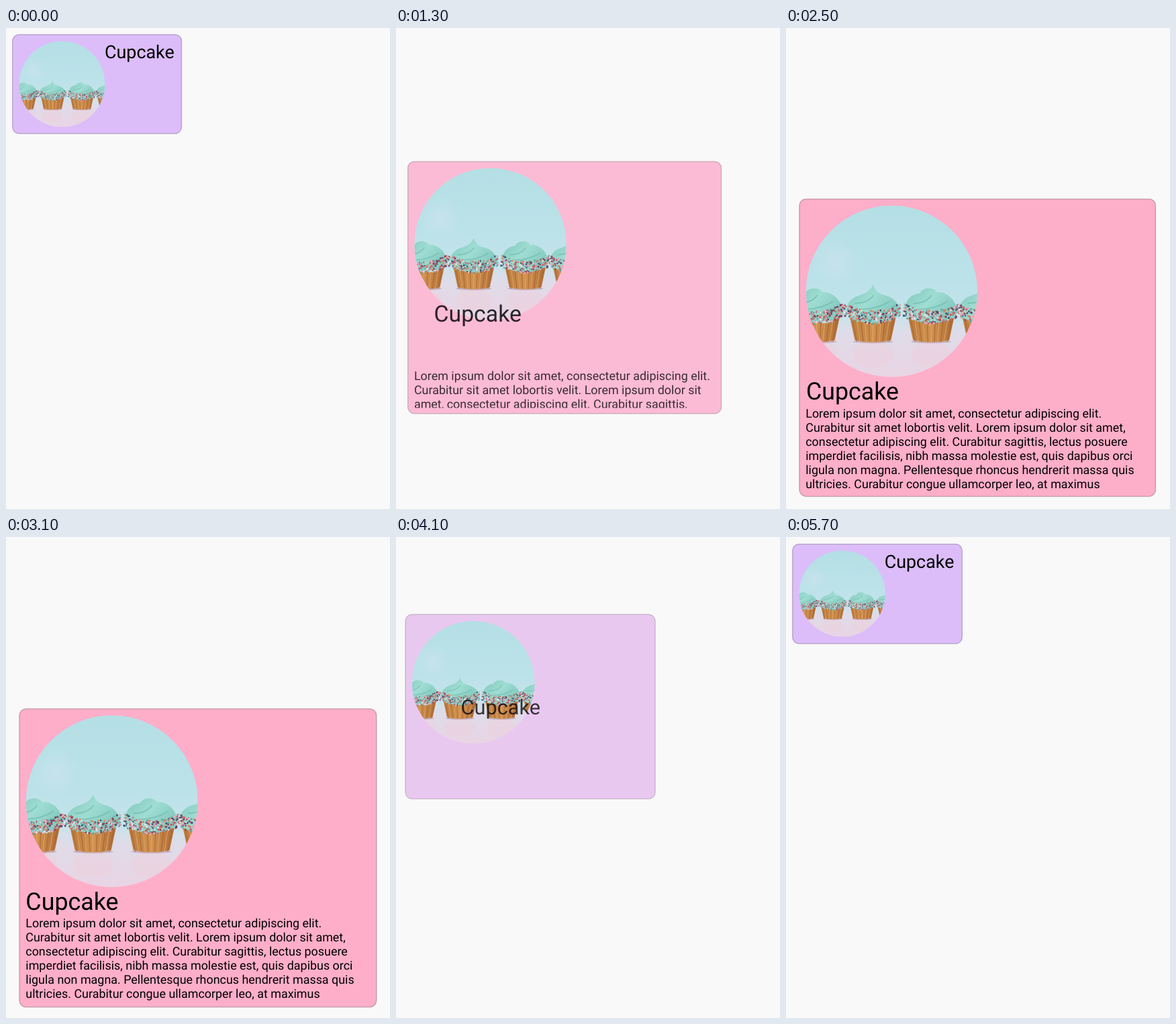
Recreate the animation shown at these times as an HTML page. Size 572 by 716 pixels, loop 5800 ms.

```html
<!DOCTYPE html>
<html lang="en">
<head>
<meta charset="utf-8">
<title>Cupcake card</title>
<style>
  html, body { margin: 0; width: 100%; height: 100%; overflow: hidden; background: #f9f9f9; }
  svg { display: block; width: 572px; height: 716px; }
  text { font-family: Roboto, sans-serif; fill: #000; text-rendering: geometricPrecision; }
</style>
</head>
<body>
<svg id="stage" viewBox="0 0 572 716">
  <defs>
    <clipPath id="round"><circle cx="128" cy="128" r="128"/></clipPath>
    <clipPath id="bodyClip"><rect id="bodyBox" x="0" width="572"/></clipPath>
    <linearGradient id="sky" x1="0" y1="0" x2="0" y2="1">
      <stop offset="0" stop-color="#b4dfe5"/>
      <stop offset=".45" stop-color="#bce2e9"/>
      <stop offset=".64" stop-color="#c5e3eb"/>
      <stop offset=".7" stop-color="#d6dfea"/>
      <stop offset=".76" stop-color="#e0dbe8"/>
      <stop offset="1" stop-color="#e9d4e4"/>
    </linearGradient>
    <radialGradient id="glow">
      <stop offset="0" stop-color="#cfe4ee" stop-opacity=".6"/>
      <stop offset="1" stop-color="#cfe4ee" stop-opacity="0"/>
    </radialGradient>
    <linearGradient id="wrap" x1="0" x2="1">
      <stop offset="0" stop-color="#b97a3e"/>
      <stop offset=".5" stop-color="#d2924f"/>
      <stop offset="1" stop-color="#ae6c36"/>
    </linearGradient>
    <linearGradient id="cream" x1="0" y1="0" x2="1" y2=".6">
      <stop offset="0" stop-color="#7fc6ba"/>
      <stop offset=".5" stop-color="#9fddd3"/>
      <stop offset="1" stop-color="#82c7bd"/>
    </linearGradient>
  </defs>
  <g id="under"></g>
  <g id="over"></g>
  <g id="photo"><g id="scene" clip-path="url(#round)"></g></g>
  <g id="body" clip-path="url(#bodyClip)"></g>
  <text id="title">Cupcake</text>
</svg>
<script>
const LOOP = 5800, STEP = 100;
const OPEN_AT = 576, CLOSE_AT = 3603, RATE = 3.86;
const PURPLE = '#dcbdfa', ROSE = '#feaec9';
const DP = 1.28, PAD = 8 * DP, BODY_SIZE = 14 * DP;
const WORDS = ('Lorem ipsum dolor sit amet, consectetur adipiscing elit. ' +
  'Curabitur sit amet lobortis velit. Lorem ipsum dolor sit amet, ' +
  'consectetur adipiscing elit. Curabitur sagittis, lectus posuere ' +
  'imperdiet facilisis, nibh massa molestie est, quis dapibus orci ' +
  'ligula non magna. Pellentesque rhoncus hendrerit massa quis ' +
  'ultricies. Curabitur congue ullamcorper leo, at maximus').split(' ');

const $ = id => document.getElementById(id);
const set = (el, attrs) => {
  for (const k in attrs) el.setAttribute(k, attrs[k]);
  return el;
};
const add = (parent, tag, attrs) =>
  parent.appendChild(set(document.createElementNS('http://www.w3.org/2000/svg', tag), attrs));
const mix = (a, b, p) => a + (b - a) * p;

let seed = 7;
const rand = () => (seed = seed * 16807 % 2147483647) / 2147483647;

// Photo, drawn in a 256 x 256 box
const SPRINKLES = ['#cf5468', '#e9dfe3', '#3c5378', '#d98760', '#57a9a4', '#e3a9b6', '#7e4058', '#8fcfc4', '#b9747c'];
const PEAK = 'M-40 160C-41 146-31 138-23 135C-11 131-4 128 0 118C4 128 9 132 19 134C32 138 39 146 40 160C30 180-30 180-40 160Z';
const SWIRL = 'M-39 160C-41 142-30 132-17 131C-12 121 4 122 8 129C25 128 38 142 39 160C30 180-30 180-39 160Z';

function cupcake(cx, frosting) {
  const g = add($('scene'), 'g', { transform: `translate(${cx} 0)` });
  add(g, 'ellipse', { cx: 0, cy: 203, rx: 30, ry: 2.5, fill: '#a98593', opacity: .5 });
  add(g, 'path', { d: 'M-34 168H34L27 201Q0 207-27 201Z', fill: 'url(#wrap)' });
  for (let i = -5; i <= 5; i++)
    add(g, 'path', { d: `M${i * 6} 172L${i * 4.8} 203`, stroke: i % 2 ? '#a4622f' : '#dfab70', 'stroke-width': 1.3, opacity: .7 });
  add(g, 'path', { d: frosting, fill: 'url(#cream)' });
  add(g, 'path', {
    d: 'M-27 146Q-8 146 1 134M-20 155Q6 155 25 143M6 161Q22 159 31 150',
    fill: 'none', stroke: '#6cb8ac', 'stroke-width': 2, opacity: .6
  });
  for (let i = 0; i < 230; i++) {
    const u = rand() * 2 - 1, v = rand() * 2 - 1;
    add(g, 'circle', {
      cx: (u * 42).toFixed(1), cy: (167 - 12 * u * u + v * 10).toFixed(1),
      r: (1 + rand() * .7).toFixed(1), fill: SPRINKLES[Math.floor(rand() * SPRINKLES.length)]
    });
  }
}

add($('scene'), 'rect', { width: 256, height: 256, fill: 'url(#sky)' });
add($('scene'), 'circle', { cx: 44, cy: 84, r: 36, fill: 'url(#glow)' });
[16, 100, 187].forEach(x =>
  add($('scene'), 'ellipse', { cx: x, cy: 222, rx: 30, ry: 20, fill: '#edccd9', opacity: .4 }));
cupcake(16, SWIRL);
cupcake(100, PEAK);
cupcake(187, SWIRL);
cupcake(268, PEAK);

const rows = Array.from({ length: 6 }, (_, i) =>
  add($('body'), 'text', { 'font-size': BODY_SIZE }));
const pen = document.createElement('canvas').getContext('2d');
pen.font = BODY_SIZE + 'px Roboto, sans-serif';

function wrapWords(width) {
  const lines = [''];
  for (const word of WORDS) {
    const last = lines.length - 1;
    const longer = lines[last] ? lines[last] + ' ' + word : word;
    if (pen.measureText(longer).width <= width) lines[last] = longer;
    else lines.push(word);
  }
  return lines;
}

const cards = ['under', 'over'].map(id => ({
  group: $(id),
  fill: add($(id), 'rect', { rx: PAD }),
  edge: add($(id), 'rect', { rx: PAD - DP / 2, fill: 'none', stroke: '#888', 'stroke-opacity': .5, 'stroke-width': DP })
}));

// Critically damped spring from 0 to 1
function spring(ms) {
  const x = Math.max(0, ms) / 1000 * RATE;
  return 1 - (1 + x) * Math.exp(-x);
}

function draw(t) {
  const closing = t >= CLOSE_AT;
  const q = spring(t - (closing ? CLOSE_AT : OPEN_AT));
  const p = closing ? 1 - q : q;

  const x = mix(9.2, 19.5, p), y = mix(9.3, 255.3, p);
  const w = mix(252.9, 533, p), h = mix(148.5, 445.2, p);
  const colors = closing ? [ROSE, PURPLE] : [PURPLE, ROSE];
  cards.forEach((card, i) => {
    set(card.group, { opacity: i ? q : 1 - q });
    set(card.fill, { x, y, width: w, height: h, fill: colors[i] });
    set(card.edge, { x: x + DP / 2, y: y + DP / 2, width: w - DP, height: h - DP });
  });

  set($('photo'), { transform: `translate(${x + PAD} ${y + PAD}) scale(${mix(.5, 1, p)})` });
  set($('title'), {
    x: mix(147, 29.3, p), y: mix(44.5, 555.6, p),
    'font-size': mix(21, 28, p) * DP, opacity: 1 - p * (1 - p)
  });

  // The paragraph reflows with the card and is cut at its padding
  const lines = wrapWords(w - 2 * PAD);
  rows.forEach((row, i) => {
    set(row, { x: x + 9.8, y: y + 325.8 + i * 21 });
    row.textContent = lines[i] || '';
  });
  set($('body'), { opacity: p });
  set($('bodyBox'), { y, height: h - 9 });
}

const start = performance.now();
function tick() {
  const t = (performance.now() - start) % LOOP;
  draw(Math.floor(t / STEP) * STEP);
  requestAnimationFrame(tick);
}
tick();
</script>
</body>
</html>
```
